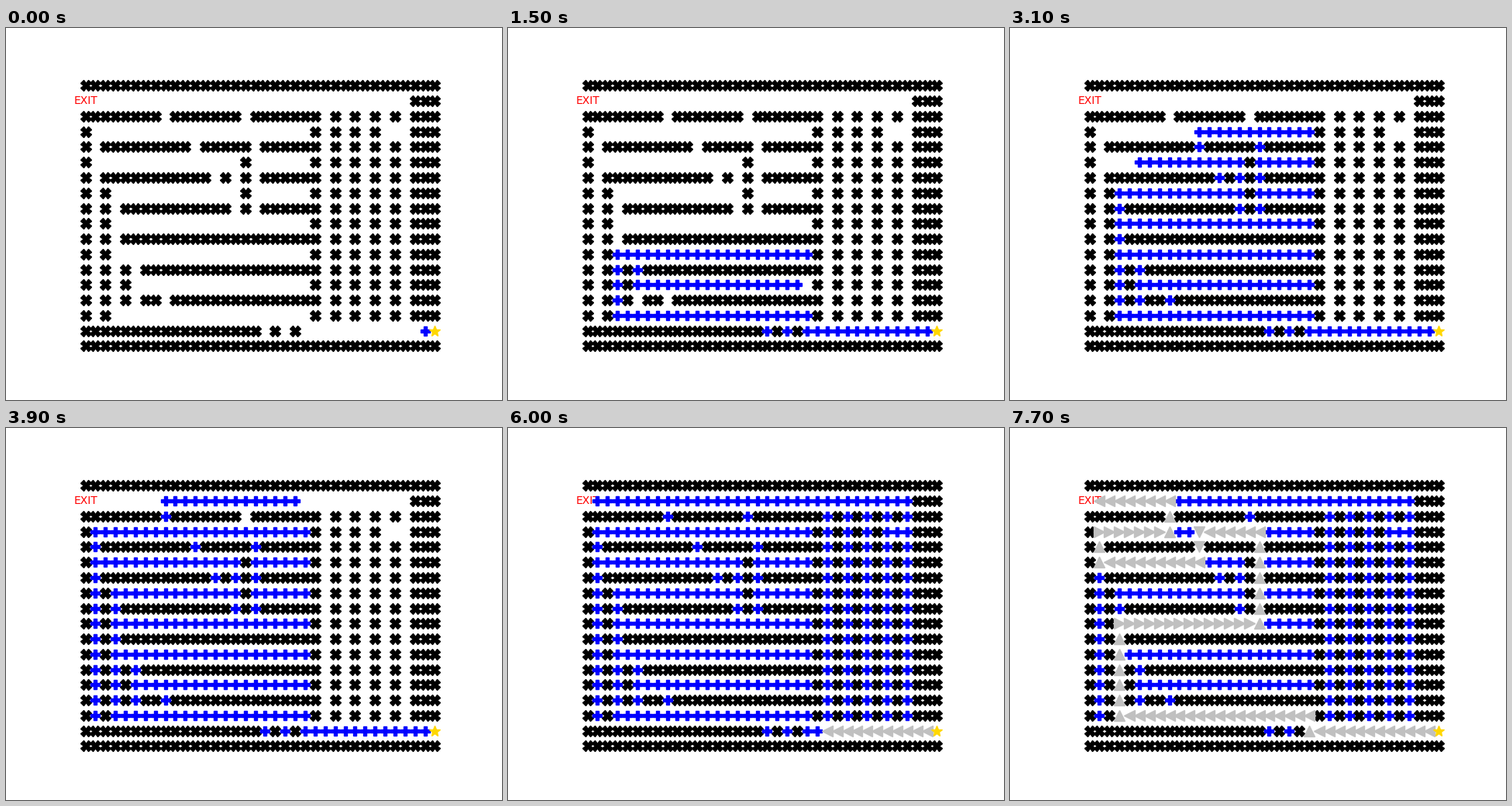
Write a matplotlib script that moves like this. It is 640 px wide and 480 px high and loops after 7800 ms.

```python
import matplotlib.pyplot as plt
from matplotlib.animation import FuncAnimation

COLS, ROWS = 36, 18
START, EXIT = (35, 16), (0, 1)
FRAMES, STEP, PAUSE = 78, 5, 4
MOVES = {(1, 0): '>', (0, 1): 'v', (-1, 0): '<', (0, -1): '^'}

# Openings in the wall rows and pillars in the corridor rows
GAPS = {2: [8, 16], 4: [1, 11, 17], 6: [1, 13, 15, 17], 8: [1, 3, 15, 17],
        10: [1, 3], 12: [1, 3, 5], 14: [1, 3, 5, 8],
        16: [18, 20, *range(22, 35)]}
PILLARS = {5: [16], 7: [2, 16], 9: [2], 11: [2], 13: [2, 4], 15: [2]}


def build_maze():
    cells = {(c, 1) for c in range(1, 33)} | {START, EXIT, (31, 3)}
    for r in range(2, 17, 2):
        cells |= {(c, r) for c in GAPS[r]}
    for r in range(3, 16, 2):
        cells |= {(c, r) for c in range(1, 23) if c not in PILLARS.get(r, [])}
    cells |= {(c, r) for c in range(24, 33, 2) for r in range(2, 16)}
    return cells


def explore(cell, parent, order):
    """Depth-first walk: right, down, left, up."""
    for dx, dy in MOVES:
        nxt = (cell[0] + dx, cell[1] + dy)
        if nxt in free and nxt not in parent:
            parent[nxt] = cell
            order.append(nxt)
            explore(nxt, parent, order)


def trace(parent):
    """Cells from start to exit, each with the arrow to the next one."""
    steps, cell = [], EXIT
    while parent[cell] != START:
        prev = parent[cell]
        move = (cell[0] - prev[0], cell[1] - prev[1])
        steps.append((prev, MOVES[move]))
        cell = prev
    return steps[::-1]


free = build_maze()
walls = [(c, r) for r in range(ROWS) for c in range(COLS) if (c, r) not in free]
parent, order = {START: None}, []
explore(START, parent, order)
order.remove(EXIT)
route = trace(parent)

fig, ax = plt.subplots(figsize=(6.4, 4.8), dpi=100)
ax.plot(*zip(*walls), 'X', color='black', ms=10)
ax.invert_yaxis()
ax.axis('off')
ax.text(*EXIT, 'EXIT', color='red', size=10, ha='center', va='center', zorder=1.5)
ax.plot(*START, '*', color='gold', ms=10, zorder=4)
seen, = ax.plot([], [], 'P', color='blue', ms=8)
arrows = {m: ax.plot([], [], m, color='silver', ms=10)[0] for m in MOVES.values()}


def place(line, cells):
    line.set_data([c for c, _ in cells], [r for _, r in cells])


def draw(i):
    n = 1 + STEP * i
    done = route[:max(0, n - len(order) - PAUSE)]
    walked = {cell for cell, _ in done}
    place(seen, [cell for cell in order[:n] if cell not in walked])
    for mark, line in arrows.items():
        place(line, [cell for cell, m in done if m == mark])
    return [seen, *arrows.values()]


anim = FuncAnimation(fig, draw, frames=FRAMES, interval=100, repeat=True)
plt.show()
```
